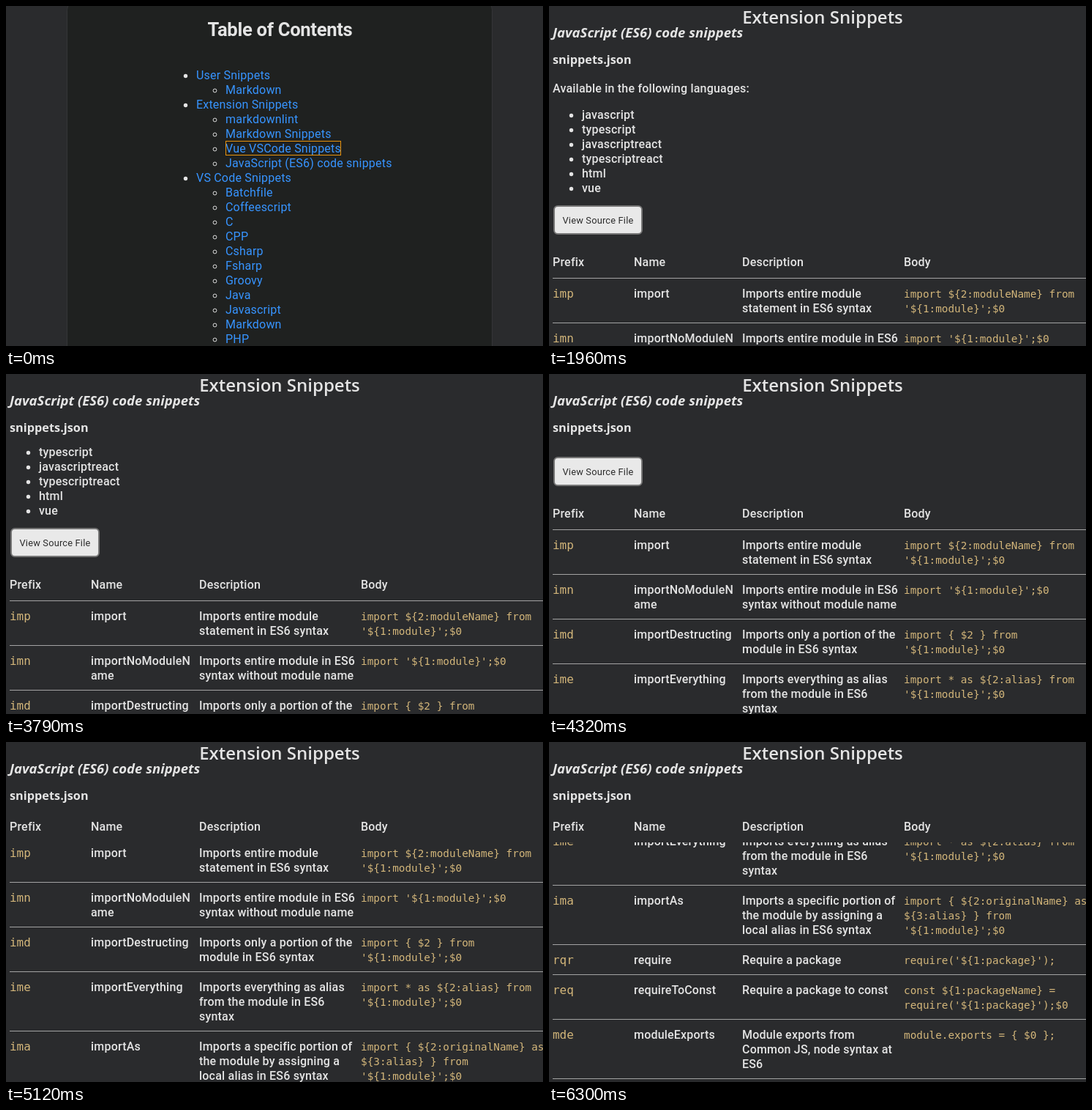
These frames come from a looping animation (734 px wide and 464 px high, 6660 ms). An HTML page:

```html
<!DOCTYPE html>
<html lang="en">
<head>
<meta charset="utf-8">
<title>Snippet browser</title>
<style>
  html, body { margin: 0; width: 100%; height: 100%; overflow: hidden; background: #2a2b2d; }
  svg { display: block; }
  text { font: 16px Roboto, sans-serif; letter-spacing: .2px; fill: #e4e4e4; white-space: pre; }
  .link { fill: #3794ff; }
  .title { font-size: 25.6px; font-weight: 700; letter-spacing: -.3px; text-anchor: middle; }
  .body { font-weight: 500; }
  .h2, .h3, .h4 { font-family: "Open Sans", sans-serif; letter-spacing: 0; }
  .h2 { font-size: 24px; font-weight: 600; text-anchor: middle; }
  .h3 { font-size: 18.5px; font-weight: 700; font-style: italic; }
  .h4 { font-size: 16.3px; font-weight: 700; }
  .prefix, .code { font-family: "DejaVu Sans Mono", monospace; letter-spacing: 0; fill: #d3b67a; }
  .prefix { font-size: 15.95px; }
  .code { font-size: 14.35px; }
  .button { font-size: 12.8px; fill: #2c2c2c; }
  .page { fill: #2a2b2d; }
</style>
</head>
<body>
<svg id="stage" width="734" height="464" viewBox="0 0 734 464"></svg>
<script>
(() => {
const LOOP = 6660, FOCUS_AT = 1040, OPEN_AT = 1960;
const HEADER_STICKS_AT = 234;

// Each scroll gesture: moments of change and the offset reached at each.
const gestures = [
  [[3310, 3380, 3430], [1, 9, 20]],
  [[3630, 3690, 3750, 3810, 3870, 3930, 3990], [23, 38, 62, 88, 110, 128, 140]],
  [[4240, 4320, 4380, 4450, 4530, 4600, 4680], [143, 159, 174, 185, 193, 198, 200]],
  [[4880, 4960, 5040, 5120, 5180, 5260, 5330, 5400, 5480],
   [201, 209, 224, 241, 260, 283, 302, 314, 320]],
  [[5800, 5860, 5930, 6000, 6080, 6150, 6230, 6300],
   [323, 332, 352, 378, 402, 421, 434, 440]],
];
const scrollSteps = gestures.flatMap(([times, offsets]) => times.map((t, i) => [t, offsets[i]]));

// Nested arrays are the second level.
const contents = [
  "User Snippets", ["Markdown"],
  "Extension Snippets",
  ["markdownlint", "Markdown Snippets", "Vue VSCode Snippets", "JavaScript (ES6) code snippets"],
  "VS Code Snippets",
  ["Batchfile", "Coffeescript", "C", "CPP", "Csharp", "Fsharp", "Groovy", "Java",
   "Javascript", "Markdown", "PHP"],
];
const languages = ["javascript", "typescript", "javascriptreact", "typescriptreact", "html", "vue"];
const columns = [5, 116, 264, 485];
const rows = [
  ["imp", "import", "Imports entire module|statement in ES6 syntax",
   "import ${2:moduleName} from|'${1:module}';$0"],
  ["imn", "importNoModuleN|ame", "Imports entire module in ES6|syntax without module name",
   "import '${1:module}';$0"],
  ["imd", "importDestructing", "Imports only a portion of the|module in ES6 syntax",
   "import { $2 } from|'${1:module}';$0"],
  ["ime", "importEverything", "Imports everything as alias|from the module in ES6|syntax",
   "import * as ${2:alias} from|'${1:module}';$0"],
  ["ima", "importAs",
   "Imports a specific portion of|the module by assigning a|local alias in ES6 syntax",
   "import { ${2:originalName} as|${3:alias} } from|'${1:module}';$0"],
  ["rqr", "require", "Require a package", "require('${1:package}');"],
  ["req", "requireToConst", "Require a package to const",
   "const ${1:packageName} =|require('${1:package}');$0"],
  ["mde", "moduleExports", "Module exports from|Common JS, node syntax at|ES6",
   "module.exports = { $0 };"],
];

function add(parent, tag, attrs = {}, content = "") {
  const el = document.createElementNS("http://www.w3.org/2000/svg", tag);
  for (const key in attrs) el.setAttribute(key, attrs[key]);
  el.textContent = content;
  return parent.appendChild(el);
}
const write = (parent, cls, x, y, content) => add(parent, "text", { class: cls, x, y }, content);
const box = (parent, x, y, width, height, attrs) =>
  add(parent, "rect", { x, y, width, height, ...attrs });
const disc = (parent, cx, cy) => add(parent, "circle", { cx, cy, r: 2.7, fill: "#e4e4e4" });

const stage = document.getElementById("stage");

// Table of contents
const index = add(stage, "g");
box(index, 83.5, -6.5, 581, 500, { rx: 12, fill: "#1f2120", stroke: "#343537" });
write(index, "title", 374.5, 41, "Table of Contents");
let baseline = 100;
for (const entry of contents) {
  const nested = Array.isArray(entry);
  for (const label of [entry].flat()) {
    if (nested) {
      add(index, "circle", { cx: 285.5, cy: baseline - 4.5, r: 2.4, fill: "none", stroke: "#e4e4e4" });
    } else {
      disc(index, 245.5, baseline - 4.5);
    }
    write(index, "link", nested ? 300 : 260, baseline, label);
    baseline += 20;
  }
}
const focusRing = box(index, 300.5, 184.5, 157, 19, { fill: "none", stroke: "#e8930c" });

// Snippet page
const page = add(stage, "g");
const scroller = add(page, "g");
write(scroller, "body", 5, 118, "Available in the following languages:");
languages.forEach((name, i) => {
  disc(scroller, 30.5, 149.5 + i * 20);
  write(scroller, "body", 45, 154 + i * 20, name);
});
box(scroller, 7, 273, 120, 38, { rx: 5, fill: "#e9e9e9", stroke: "#767676", "stroke-width": 2 });
write(scroller, "button", 18.5, 297, "View Source File");

const rule = y => box(scroller, 5, y, 729, 1, { fill: "#a3a3a3" });
const cellStyles = ["prefix", "body", "body", "code"];
let rowTop = 371;
rule(rowTop);
for (const row of rows) {
  const cells = row.map(cell => cell.split("|"));
  cells.forEach((lines, c) => lines.forEach((s, i) =>
    write(scroller, cellStyles[c], columns[c], rowTop + 27 + i * 20, s)));
  rowTop += 21 + 20 * Math.max(...cells.map(lines => lines.length));
  rule(rowTop);
}

const header = add(page, "g");
const headerFill = box(header, 0, 328, 734, 43, { class: "page" });
["Prefix", "Name", "Description", "Body"].forEach((s, c) => write(header, "body", columns[c], 355, s));

box(page, 0, 0, 734, 98, { class: "page" });
write(page, "h2", 374, 24, "Extension Snippets");
write(page, "h3", 5, 43, "JavaScript (ES6) code snippets");
write(page, "h4", 5, 79, "snippets.json");

const shift = (el, y) => el.setAttribute("transform", `translate(0 ${-y})`);

function render(t) {
  const opened = t >= OPEN_AT, moved = t >= FOCUS_AT;
  index.style.display = opened ? "none" : "";
  page.style.display = opened ? "" : "none";
  focusRing.setAttribute("y", moved ? 204.5 : 184.5);
  focusRing.setAttribute("width", moved ? 227 : 157);
  let offset = 0;
  for (const [at, y] of scrollSteps) if (t >= at) offset = y;
  shift(scroller, offset);
  shift(header, Math.min(offset, HEADER_STICKS_AT));
}

const start = performance.now();
function tick() {
  render((performance.now() - start) % LOOP);
  requestAnimationFrame(tick);
}
tick();
})();
</script>
</body>
</html>
```
